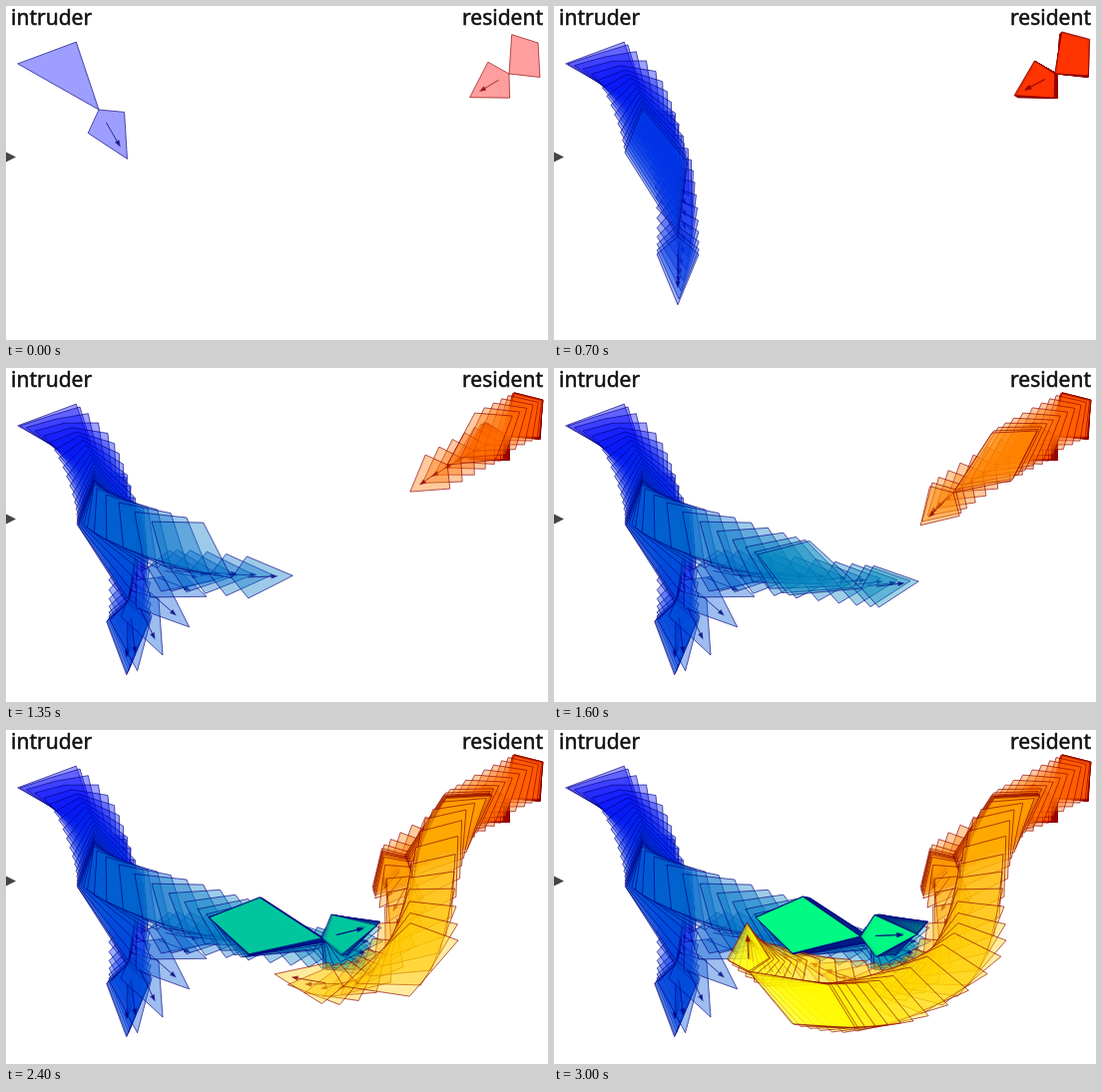
Animation, 543 px wide and 335 px high, one loop 5000 ms. Source, as an HTML page:

```html
<!DOCTYPE html>
<html lang="en">
<head>
<meta charset="utf-8">
<title>Intruder and resident</title>
<style>
  html, body { margin: 0; width: 100%; height: 100%; overflow: hidden; background: #fff; }
  svg { display: block; width: 100vw; height: 100vh; }
  text { font: 21px "Noto Sans", "Open Sans", sans-serif; fill: #111; stroke: #111; stroke-width: .5; }
  .shape { stroke-width: 1; stroke-linejoin: round; fill-opacity: .38; stroke-opacity: .65; }
  .arrow { stroke-width: 1; stroke-opacity: .75; fill-opacity: .75; }
</style>
</head>
<body>
<svg viewBox="0 0 543 335" preserveAspectRatio="none">
  <g id="trail"></g>
  <path d="M0 146.5L10 151.5L0 156.5Z" fill="#444"/>
  <text x="5" y="19">intruder</text>
  <text x="538" y="19" text-anchor="end">resident</text>
</svg>
<script>
const STEP = 50, LAST = 60, LOOP = 5000;

const bump = (k, mid, spread) => Math.exp(-(((k - mid) / spread) ** 2));

// path: step, neck x y, tail x y, heading in degrees
const intruder = {
  edge: "#000080",
  fill: t => `rgb(0,${255 * t},${255 - 127 * t})`,
  headLength: k => 57 + 15 * bump(k, 18, 8),
  flank: k => .6 + .4 * bump(k, 0, 8),
  width: () => 29,
  skew: k => 15 * bump(k, 8, 16),
  path: [
    [0, 93, 104, 41, 47, 60],
    [5, 112, 150, 71, 64, 64],
    [14, 124, 231, 89, 103, 90],
    [17, 122, 236, 89, 110, 91],
    [22, 142, 200, 88, 117, 11],
    [32, 308, 221, 204, 187, -7],
    [35, 318, 213, 204, 188, 36],
    [40, 321, 211, 204, 188, -19],
    [60, 307, 207, 202, 188, -2]
  ]
};
const resident = {
  edge: "#8b0000",
  fill: t => `rgb(255,${255 * t},0)`,
  headLength: k => 46 + 24 * bump(k, 48, 8),
  flank: () => .58,
  width: k => 25 + 9 * bump(k, 48, 8),
  skew: k => 6 + 8 * bump(k, 48, 8),
  path: [
    [0, 504, 68, 533, 37, 149],
    [21, 499, 68, 538, 32, 153],
    [32, 400, 125, 484, 63, 135],
    [37, 403, 132, 487, 66, 132],
    [40, 407, 158, 461, 80, 113],
    [44, 386, 226, 449, 142, 142],
    [48, 338, 257, 453, 211, 190],
    [54, 236, 257, 360, 292, 235],
    [60, 195, 242, 302, 299, 268]
  ]
};

// Monotone cubic between the points of a path
function poseAt(path, k) {
  let i = 0;
  while (i < path.length - 2 && path[i + 1][0] <= k) i++;
  const a = path[i], b = path[i + 1], h = b[0] - a[0], u = (k - a[0]) / h;
  const slope = (j, c) => path[j] && path[j + 1]
    ? (path[j + 1][c] - path[j][c]) / (path[j + 1][0] - path[j][0]) : 0;
  const tangent = (j, c) => {
    const p = slope(j - 1, c), q = slope(j, c);
    return p * q > 0 ? 2 * p * q / (p + q) : 0;
  };
  return a.slice(1).map((v, n) => {
    const c = n + 1, d = b[c] - v;
    const m = tangent(i, c) * h, w = tangent(i + 1, c) * h;
    return v + u * (m + u * (3 * d - 2 * m - w + u * (m + w - 2 * d)));
  });
}

// Returns a function placing points along and across a direction
const axis = (x, y, angle) => (along, across = 0) => [
  x + along * Math.cos(angle) - across * Math.sin(angle),
  y + along * Math.sin(angle) + across * Math.cos(angle)
];

const points = list => "M" + list.map(p => p.map(v => v.toFixed(1)).join(" ")).join("L");

function drawAnimal(animal, k) {
  const [x, y, tailX, tailY, heading] = poseAt(animal.path, k);
  const body = axis(x, y, Math.atan2(tailY - y, tailX - x));
  const head = axis(x, y, heading * Math.PI / 180);
  const length = Math.hypot(tailX - x, tailY - y), nose = animal.headLength(k);
  const side = length * animal.flank(k), w = animal.width(k), skew = animal.skew(k);
  const ear = nose * .26, tip = nose * .76;
  const fill = animal.fill(k / LAST), edge = animal.edge;
  const quad = list =>
    `<path class="shape" fill="${fill}" stroke="${edge}" d="${points(list)}Z"/>`;
  return quad([body(0), body(side - skew, w), body(length), body(side + skew, -w)])
    + quad([head(0), head(ear, 21), head(nose), head(ear, -21)])
    + `<path class="arrow" stroke="${edge}" d="${points([head(ear), head(tip - 3)])}"/>`
    + `<path class="arrow" fill="${edge}" d="${
      points([head(tip), head(tip - 7, 2.5), head(tip - 7, -2.5)])}Z"/>`;
}

const trail = document.getElementById("trail");
trail.innerHTML = Array.from({ length: LAST + 1 }, (_, k) =>
  `<g>${drawAnimal(intruder, k)}${drawAnimal(resident, k)}</g>`).join("");
const steps = [...trail.children];

let shown = -1;
function render(ms) {
  const now = Math.min(LAST, Math.floor(ms % LOOP / STEP));
  if (now === shown) return;
  shown = now;
  steps.forEach((g, k) => g.style.display = k <= now ? "" : "none");
}

const start = performance.now();
function tick() {
  render(performance.now() - start);
  requestAnimationFrame(tick);
}
tick();
</script>
</body>
</html>
```
